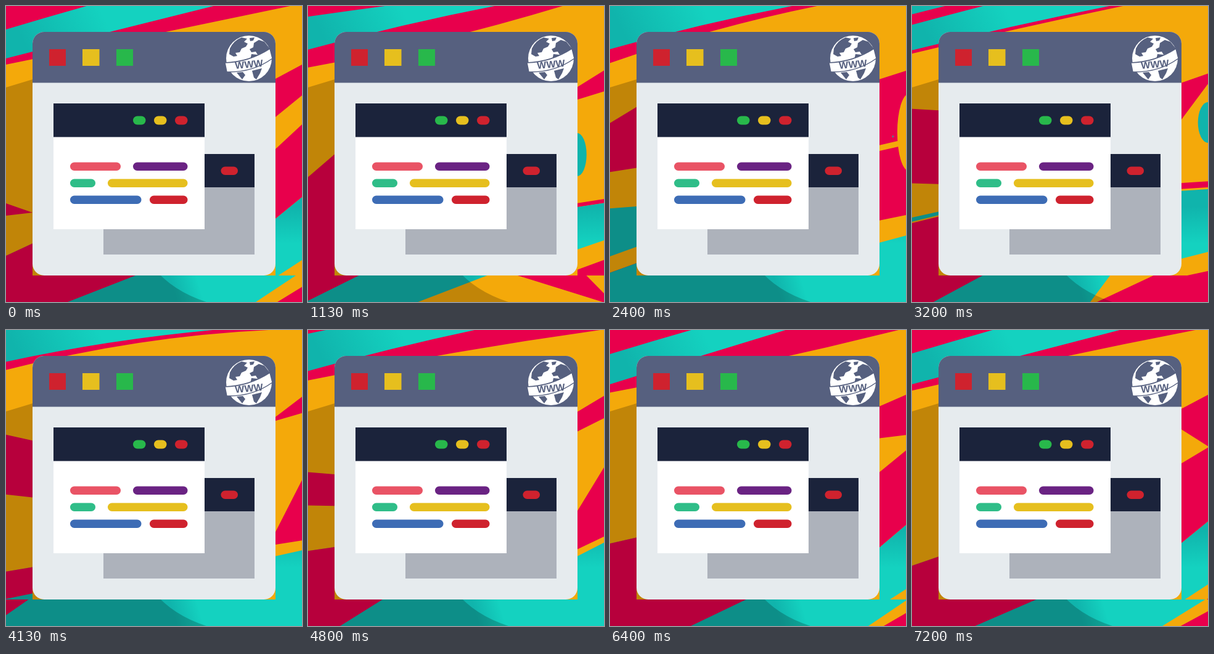
An HTML page with a canvas that plays this animation: 480x480 px, repeating every 7.27 s.

```html
<!DOCTYPE html>
<html lang="en">
<head>
<meta charset="utf-8">
<title>Browser windows</title>
<style>
  html, body { margin: 0; width: 100%; height: 100%; overflow: hidden; }
  canvas, svg { position: absolute; left: 0; top: 0; width: 480px; height: 480px; }
  .red { fill: #cf222e; }
  .gold { fill: #e6bf1e; }
  .green { fill: #28b84b; }
  .navy { fill: #1b233b; }
  .slate { fill: #56607f; }
  text { font: bold 16px "Liberation Sans", Arial, sans-serif; }
</style>
</head>
<body>
<canvas id="paint" width="480" height="480"></canvas>
<svg viewBox="0 0 480 480">
  <rect x="43" y="42" width="394" height="395" rx="19" fill="#e6ebee"/>
  <path class="slate" d="M43 124.500V61a19 19 0 0 1 19-19H418a19 19 0 0 1 19 19V124.500Z"/>
  <rect class="red" x="70" y="70" width="27" height="27"/>
  <rect class="gold" x="124" y="70" width="27.500" height="27"/>
  <rect class="green" x="179" y="70" width="27" height="27"/>

  <circle cx="394" cy="85" r="37" fill="#fff"/>
  <g class="slate">
    <path d="M363 69Q369 56 382 51L391 53 386 58 392 61 389 66 382 69 379 75 372 76 375 81 369 82 362 78Z"/>
    <path d="M395 52L403 51 401 56 396 57ZM402 60L410 55 419 58 427 68 429 77 422 76 419 82 414 77 408 79 405 74 398 75 395 70 401 67Z"/>
    <path d="M398 78L408 79 416 84 396 87ZM399 105L415 101 412 109 406 119 402 116ZM374 108L384 107 388 112 383 119Z"/>
  </g>
  <path d="M355 92Q394 91 428 69L432 85Q400 108 358 107Z" fill="#fff" stroke="#56607f" stroke-width="1.500"/>
  <text class="slate" x="394" y="100" text-anchor="middle" transform="rotate(-5 394 95)">WWW</text>

  <rect x="158" y="240" width="245" height="163" fill="#adb2bb"/>
  <rect class="navy" x="158" y="240" width="245" height="54"/>
  <rect class="red" x="348.500" y="260.500" width="27.500" height="13.500" rx="6.750"/>

  <rect x="77" y="158" width="245" height="204" fill="#fff"/>
  <rect class="navy" x="77" y="158" width="245" height="54.500"/>
  <rect class="green" x="206" y="178.500" width="20.500" height="14" rx="7"/>
  <rect class="gold" x="240" y="178.500" width="20.500" height="14" rx="7"/>
  <rect class="red" x="274" y="178.500" width="20.500" height="14" rx="7"/>

  <rect x="104" y="253.500" width="82" height="13.500" rx="6.750" fill="#e95365"/>
  <rect x="206" y="253.500" width="88.500" height="13.500" rx="6.750" fill="#6a2383"/>
  <rect x="104" y="280.500" width="41" height="13.500" rx="6.750" fill="#2fbd88"/>
  <rect class="gold" x="165" y="280.500" width="129.500" height="13.500" rx="6.750"/>
  <rect x="104" y="307.500" width="115.500" height="13.500" rx="6.750" fill="#3d6cb5"/>
  <rect class="red" x="233" y="307.500" width="61.500" height="13.500" rx="6.750"/>
</svg>
<script>
const ctx = document.getElementById('paint').getContext('2d');
const LOOP = 7270, STEP = LOOP / 109;
const RED = '#e8004c', YELLOW = '#f4a90a', TEAL = '#10b4ac', AQUA = '#14d2c0';

function blend(x0, y0, x1, y1) {
  const g = ctx.createLinearGradient(x0, y0, x1, y1);
  g.addColorStop(0, TEAL);
  g.addColorStop(1, AQUA);
  return g;
}
const topTeal = blend(30, 60, 150, 0);
const sideTeal = blend(0, 325, 0, 385);
const floorTeal = blend(265, 437, 305, 425);

const hues = {
  top: [RED, topTeal, RED, YELLOW],
  left: [RED, YELLOW, TEAL, YELLOW, RED, TEAL],
  right: [RED, YELLOW, RED, YELLOW, sideTeal, YELLOW, RED],
  floor: [floorTeal, YELLOW, RED, YELLOW]
};

// Band edges per pose. top: y at x 0, 240, 480. left: y at x 0, 43.
// right: y at x 437, 480. floor: x at y 437, 480. Blobs: cx, cy, rx, ry.
const poses = [
  { at: 0,
    top: [[-40, -90, -140], [38, -30, -90], [85, 24, -35], [95, 46, -4]],
    left: [[320, 335], [340, 335], [405, 385], [405, 385], [405, 385], [524, 454]],
    right: [[118, 95], [180, 145], [232, 192], [345, 310], [345, 310], [440, 412], [470, 440]],
    floor: [[210, 100], [470, 405], [510, 440], [560, 560]],
    teal: [430, 240, 0, 0], gold: [500, 205, 0, 0] },
  { at: 1130,
    top: [[-25, -60, -100], [16, -14, -40], [70, 12, -30], [100, 48, -22]],
    left: [[275, 235], [478, 455], [478, 455], [478, 455], [478, 455], [478, 455]],
    right: [[132, 105], [150, 138], [325, 320], [325, 320], [325, 320], [392, 378], [425, 410]],
    floor: [[75, -10], [280, 165], [330, 480], [445, 490]],
    teal: [437, 241, 16, 37], gold: [500, 205, 0, 0] },
  { at: 2400,
    top: [[-60, -90, -140], [-20, -50, -70], [70, 11, -30], [92, 20, -25]],
    left: [[185, 160], [258, 252], [320, 318], [402, 387], [430, 415], [430, 415]],
    right: [[118, 105], [230, 220], [230, 220], [349, 340], [387, 375], [520, 520], [540, 540]],
    floor: [[-60, -80], [560, 560], [580, 580], [600, 600]],
    teal: [460, 210, 0, 0], gold: [484, 205, 20, 66] },
  { at: 3200,
    top: [[20, -40, -90], [35, -30, -90], [72, 17, -30], [76, 22, -28]],
    left: [[165, 170], [290, 292], [345, 335], [345, 335], [345, 335], [520, 460]],
    right: [[125, 110], [180, 118], [292, 290], [292, 290], [292, 290], [400, 388], [430, 420]],
    floor: [[130, 45], [300, 265], [375, 275], [560, 560]],
    teal: [482, 187, 18, 36], gold: [484, 205, 0, 0] },
  { at: 4130,
    top: [[-60, -90, -140], [-20, -50, -80], [50, 10, -8], [64, 17, 0]],
    left: [[170, 180], [265, 270], [395, 388], [395, 388], [395, 388], [430, 425]],
    right: [[142, 108], [145, 136], [330, 240], [352, 345], [372, 362], [520, 520], [540, 540]],
    floor: [[30, -30], [560, 560], [580, 580], [600, 600]],
    teal: [490, 187, 0, 0], gold: [484, 205, 0, 0] },
  { at: 5530,
    top: [[-40, -90, -140], [40, -30, -90], [88, 2, -80], [105, 62, -2]],
    left: [[310, 305], [310, 305], [310, 305], [310, 305], [310, 305], [540, 500]],
    right: [[120, 105], [190, 152], [245, 200], [360, 322], [360, 322], [455, 428], [480, 448]],
    floor: [[240, 160], [490, 432], [520, 452], [560, 560]],
    teal: [490, 187, 0, 0], gold: [44, 366, 5, 20] },
  { at: 7200,
    top: [[-40, -90, -140], [38, -30, -90], [88, 26, -35], [98, 44, -4]],
    left: [[385, 370], [385, 370], [385, 370], [385, 370], [385, 370], [524, 454]],
    right: [[128, 105], [160, 190], [215, 190], [345, 310], [345, 310], [440, 412], [470, 435]],
    floor: [[200, 100], [475, 405], [515, 435], [560, 560]],
    teal: [490, 187, 0, 0], gold: [442, 188, 11, 31] }
];

function mix(a, b, k) {
  return Array.isArray(a) ? a.map((v, i) => mix(v, b[i], k)) : a + (b - a) * k;
}

function fill(color, trace) {
  ctx.fillStyle = color;
  ctx.beginPath();
  trace();
  ctx.fill();
}

function clipped(x, y, w, h, draw) {
  ctx.save();
  ctx.beginPath();
  ctx.rect(x, y, w, h);
  ctx.clip();
  draw();
  ctx.restore();
}

function column(edges, colors, x0, x1) {
  edges.forEach(([a, b], i) => fill(colors[i], () => {
    ctx.moveTo(x0, a);
    ctx.lineTo(x1, b);
    ctx.lineTo(x1, 600);
    ctx.lineTo(x0, 600);
  }));
}

function blob([x, y, rx, ry], color) {
  fill(color, () => ctx.ellipse(x, y, rx, ry, 0, 0, Math.PI * 2));
}

function draw(t) {
  let i = 0;
  while (i < poses.length - 2 && t >= poses[i + 1].at) i++;
  const from = poses[i], to = poses[i + 1];
  const k = Math.min(1, (t - from.at) / (to.at - from.at));
  const now = key => mix(from[key], to[key], k);

  ctx.fillStyle = topTeal;
  ctx.fillRect(0, 0, 480, 480);
  now('top').forEach(([a, m, b], n) => fill(hues.top[n], () => {
    ctx.moveTo(0, a);
    ctx.quadraticCurveTo(240, 2 * m - (a + b) / 2, 480, b);
    ctx.lineTo(480, 480);
    ctx.lineTo(0, 480);
  }));

  clipped(0, 42, 60, 396, () => column(now('left'), hues.left, 0, 43));
  clipped(420, 42, 60, 396, () => column(now('right'), hues.right, 437, 480));
  blob(now('teal'), TEAL);
  blob(now('gold'), YELLOW);

  clipped(0, 437, 480, 43, () => {
    ctx.fillStyle = RED;
    ctx.fillRect(0, 437, 480, 43);
    now('floor').forEach(([a, b], n) => fill(hues.floor[n], () => {
      ctx.moveTo(a, 437);
      ctx.lineTo(b, 480);
      ctx.lineTo(700, 480);
      ctx.lineTo(700, 437);
    }));
  });

  // Fixed shadow over the lower left
  fill('rgba(0,0,0,.21)', () => {
    ctx.moveTo(0, 132);
    ctx.lineTo(43, 119);
    ctx.lineTo(240, 425);
    ctx.quadraticCurveTo(270, 462, 325, 480);
    ctx.lineTo(0, 480);
  });
}

function tick(time) {
  draw(Math.floor((time % LOOP) / STEP) * STEP);
  requestAnimationFrame(tick);
}
draw(0);
requestAnimationFrame(tick);
</script>
</body>
</html>
```
